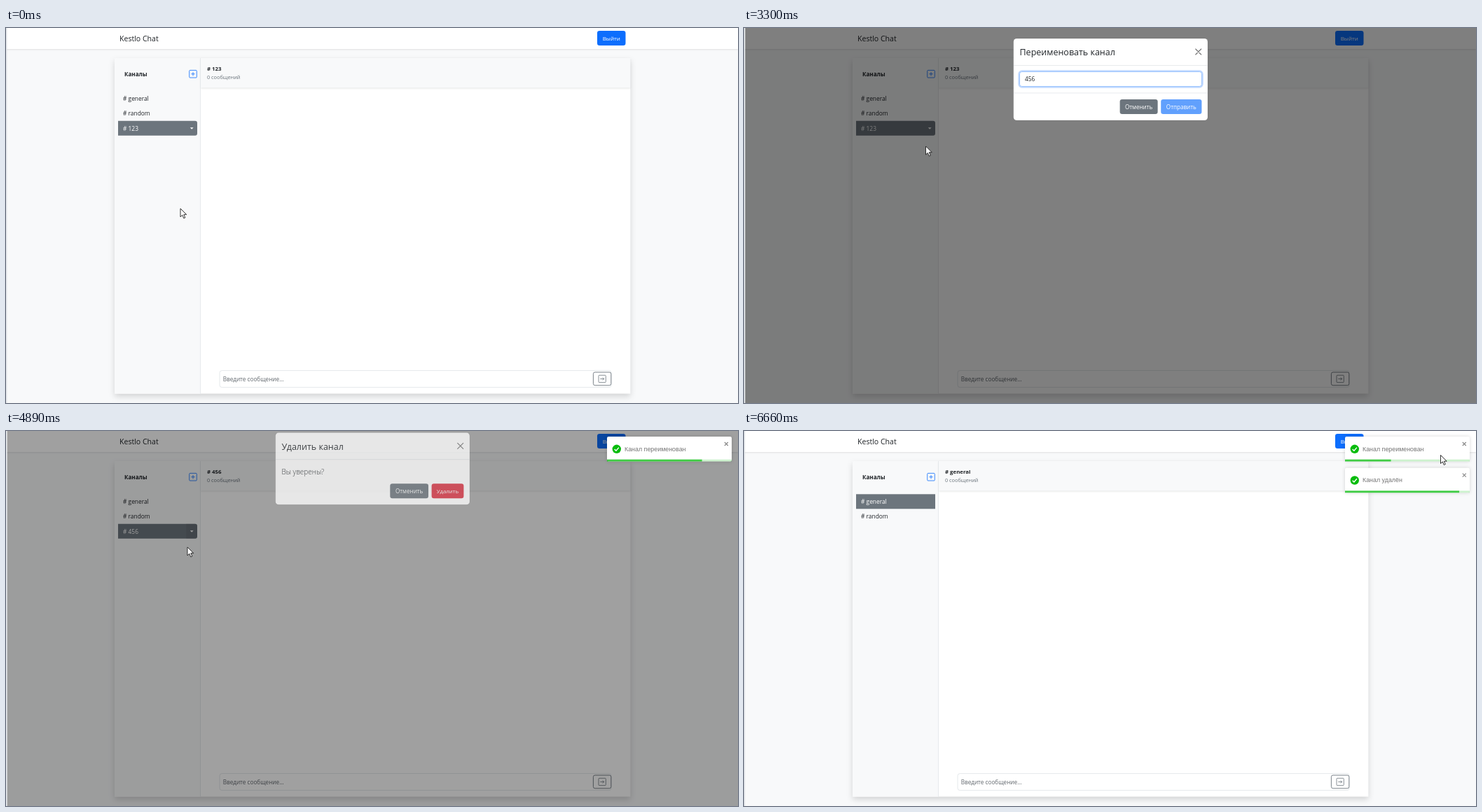
An HTML page for the animation above (6.69 s loop, 1045x536 px).

```html
<!DOCTYPE html>
<html lang="ru">
<head>
<meta charset="utf-8">
<title>Chat</title>
<style>
html, body { margin: 0; width: 100%; height: 100%; overflow: hidden; background: #f8f9fa; }
svg { display: block; width: 1045px; height: 536px; }
text { font-family: "Open Sans", "Noto Sans", sans-serif; white-space: pre; }
.toast text { font-family: "Liberation Sans", Arial, sans-serif; }
.shadow { filter: drop-shadow(0 4.4px 4.4px rgba(0,0,0,.15)); }
.shadow-sm { filter: drop-shadow(0 1px 1px rgba(0,0,0,.1)); }
.shadow-toast { filter: drop-shadow(0 .6px 2.8px rgba(0,0,0,.16)); }
</style>
</head>
<body>
<svg id="stage" viewBox="0 0 1045 536" xmlns="http://www.w3.org/2000/svg"></svg>
<script>
const LOOP = 6690, STEP = 30;
const INK = '#212529', GRAY = '#6c757d', BLUE = '#0d6efd', RED = '#dc3545', PALE = '#f8f9fa', LINE = '#dee2e6';
const stage = document.getElementById('stage');

const rect = (x, y, w, h, fill, extra = '') =>
  `<rect x="${x}" y="${y}" width="${w}" height="${h}" fill="${fill}" ${extra}/>`;
const text = (x, y, size, str, fill = INK, extra = '') =>
  `<text x="${x}" y="${y}" font-size="${size}" fill="${fill}" ${extra}>${str}</text>`;
const path = (d, stroke, width, extra = '') =>
  `<path d="${d}" fill="none" stroke="${stroke}" stroke-width="${width}" ${extra}/>`;
const group = (id, body, extra = '') => `<g id="${id}" ${extra}>${body}</g>`;

const button = (id, x, y, w, label, fill, size = 8.1) => group(id,
  rect(x, y, w, 21, fill, 'rx="3.3"') +
  text(x + w / 2, y + 13.6, size, label, '#fff', 'text-anchor="middle"'));

const modal = (id, title, height, body) => group(id,
  rect(384.7, 15, 277.3, height, '#fff', 'rx="4.4" stroke="#000" stroke-opacity=".18" stroke-width=".6"') +
  text(393.5, 39.3, 12.5, title, INK, 'font-weight="500"') +
  path('M644.7 30l8 8m0-8l-8 8', '#000', 1.1, 'opacity=".55" stroke-linecap="round"') +
  rect(385, 53, 276.8, .7, LINE) + body);

const toast = (id, y, label) => group(id,
  rect(858, y, 178, 35.5, '#fff', 'rx="2.2" class="shadow-toast"') +
  `<circle cx="871.8" cy="${y + 17.8}" r="6.2" fill="#07bc0c"/>` +
  path(`M868.7 ${y + 18}l2.2 2.3 4-4.7`, '#fff', 1.4) +
  text(883, y + 20.7, 8.9, label, '#757575') +
  path(`M1025.8 ${y + 8}l5 5m0-5l-5 5`, '#8a8a8a', 1.2) +
  rect(858, y + 32.7, 178, 2.8, '#07bc0c', 'opacity=".2"') +
  rect(858, y + 32.7, 178, 2.8, '#07bc0c', `opacity=".7" id="${id}Bar"`), 'class="toast"');

const page =
  rect(0, 0, 1045, 536, PALE) +
  rect(0, 0, 1045, 30, '#fff', 'class="shadow-sm"') +
  text(162, 18.8, 10.55, 'Kestlo Chat') +
  button('logout', 844, 4, 40.5, 'Выйти', BLUE, 8) +
  rect(155, 43, 736.3, 479.6, '#fff', 'class="shadow"') +
  rect(155, 43, 122.5, 479.6, PALE) +
  rect(278, 43, 613.3, 42.4, PALE, 'class="shadow-sm"') +
  rect(277.3, 43, .7, 479.6, LINE) +
  text(169, 69, 8.1, 'Каналы', INK, 'font-weight="700"') +
  rect(261.7, 60.4, 10.6, 10.6, 'none', `rx="1.1" stroke="${BLUE}" stroke-width=".8"`) +
  path('M267 63v5.4m-2.7-2.7h5.4', BLUE, .8) +
  rect(160, 90.3, 113, 21, GRAY, 'id="generalBg"') +
  text(167, 104, 8.4, '# general', INK, 'id="general"') +
  text(167, 125.2, 8.4, '# random') +
  group('channel',
    path('M160 132.7h110a3 3 0 0 1 3 3v15a3 3 0 0 1-3 3h-110z', 'none', 0, `style="fill:${GRAY}"`) +
    path('M257.3 132.7h12.7a3 3 0 0 1 3 3v15a3 3 0 0 1-3 3h-12.7z', 'none', 0, 'id="toggle" style="fill:#565e64"') +
    text(167, 146.5, 8.4, '', '#fff', 'id="channelName"') +
    '<path d="M262.8 142.2h4.8l-2.4 2.5z" fill="#fff"/>') +
  text(287, 61.3, 7.85, '', INK, 'id="heading" font-weight="700"') +
  text(287, 73, 7.35, '0 сообщений', GRAY) +
  rect(305, 489.6, 559, 24, '#fff', `rx="3.3" stroke="${LINE}" stroke-width=".8"`) +
  text(309.7, 504.8, 8.2, 'Введите сообщение...', '#63696f') +
  rect(838.4, 492, 25.4, 18.8, '#fff', `rx="2.4" stroke="${GRAY}" stroke-width=".9"`) +
  rect(846, 496.3, 10.3, 10.3, 'none', `rx="1" stroke="${GRAY}" stroke-width=".8"`) +
  path('M848.3 501.5h5.4m-2-2l2 2-2 2', GRAY, .8);

const menu = group('menu',
  rect(184, 154.8, 89, 45.5, '#fff', 'rx="3.3" stroke="#000" stroke-opacity=".17" stroke-width=".6"') +
  rect(184.3, 159.8, 88.4, 17.7, '#e9ecef', 'id="menuHover"') +
  text(193, 171.7, 8.2, 'Удалить') +
  text(193, 189.4, 8.2, 'Переименовать'));

const renameModal = modal('rename', 'Переименовать канал', 117,
  rect(392.4, 61.4, 262.2, 23.2, 'none', `rx="4.4" stroke="${BLUE}" stroke-opacity=".25" stroke-width="2.2"`) +
  rect(393.5, 62.5, 260, 21, '#fff', 'rx="3.3" stroke="#86b7fe" stroke-width=".8"') +
  rect(400.8, 66, 14.6, 13.4, '#2f64c8', 'id="selection"') +
  text(401, 76.1, 8.4, '', INK, 'id="field"') +
  rect(401, 67.5, .7, 11, INK, 'id="caret"') +
  rect(385, 92.6, 276.8, .7, LINE) +
  button('cancelRename', 536.6, 102, 54, 'Отменить', GRAY) +
  button('submitRename', 595.2, 102, 58.2, 'Отправить', BLUE));

const deleteModal = modal('remove', 'Удалить канал', 103,
  text(393.5, 75, 10, 'Вы уверены?', INK, 'font-weight="300"') +
  button('cancelRemove', 548.3, 88, 54.7, 'Отменить', GRAY) +
  button('submitRemove', 607.6, 88, 45.8, 'Удалить', RED, 7.9));

const cursor = group('cursor',
  '<path id="arrow" d="M0 0V12l2.8-2.6 2 4.6 2-.9-2-4.4h3.9z"/>' +
  '<path id="hand" d="M-1.3 1.2a1.3 1.3 0 0 1 2.6 0V6l4.2 1a1.6 1.6 0 0 1 1.3 1.6l-.8 4-1 2.2H.2L-3.6 9.8c-.8-1.3.6-2.2 1.4-1.4l.9.9z"/>',
  'fill="#fff" stroke="#1c1c1c" stroke-width=".9" stroke-linejoin="round"');

stage.innerHTML = page + menu + rect(1.5, 0, 1044, 536, '#000', 'id="backdrop"') +
  renameModal + deleteModal + toast('renamed', 8, 'Канал переименован') +
  toast('removed', 52.7, 'Канал удалён') + rect(0, 0, 1.4, 536, LINE) + cursor;

const el = {};
stage.querySelectorAll('[id]').forEach(node => el[node.id] = node);

const clamp = v => Math.min(1, Math.max(0, v));
const mix = (a, b, k) => a + (b - a) * k;
const within = (t, a, b) => t >= a && t < b;
const smooth = k => k * k * (3 - 2 * k);
const easeOut = k => 1 - (1 - k) ** 1.7;
const show = (node, on) => node.setAttribute('visibility', on ? 'visible' : 'hidden');
const set = (node, attrs) => { for (const k in attrs) node.setAttribute(k, attrs[k]); };
const write = (node, str) => { if (node.textContent !== str) node.textContent = str; };

function follow(keys, t, ease) {
  const i = keys.findIndex(key => key[0] > t);
  if (i < 0) return keys[keys.length - 1].slice(1);
  if (i === 0) return keys[0].slice(1);
  const a = keys[i - 1], b = keys[i], k = ease((t - a[0]) / (b[0] - a[0]));
  return a.slice(1).map((v, n) => mix(v, b[n + 1], k));
}

const POINTER = [
  [0, 249, 258], [180, 249, 258], [660, 265, 144], [860, 265, 144], [1350, 251, 187],
  [1560, 251.5, 187], [1740, 257.7, 179.5], [1860, 259.5, 169], [3540, 259.5, 169],
  [3930, 264, 143], [4260, 264, 143], [4600, 253, 167], [4860, 253.5, 167],
  [5280, 630.8, 95.5], [5520, 630.8, 95.5], [6180, 990, 46], [6660, 994.5, 34.5]
];
// Offset and opacity of a toast bouncing in from the right
const BOUNCE = [[0, 1665, 0], [.6, -14, 1], [.75, 5.5, 1], [.9, -2.8, 1], [1, 0, 1]];

function drawModal(node, t, opens, closes) {
  const closing = t >= closes, since = closing ? t - closes : t - opens;
  const fade = clamp(since / 135), slide = easeOut(clamp(since / 270));
  const opacity = closing ? 1 - fade : fade;
  show(node, opacity > 0);
  set(node, { opacity, transform: `translate(0 ${-28 * (closing ? slide : 1 - slide)})` });
  return opacity;
}

function drawToast(node, bar, t, enters, runs) {
  const [x, opacity] = follow(BOUNCE, (t - enters) / 630, k => 1 - (1 - k) ** 3);
  show(node, t >= enters);
  set(node, { opacity, transform: `translate(${x} 0)` });
  set(bar, { width: 178 * (1 - clamp((t - runs) / 4500)) });
}

function render(t) {
  const removed = t >= 5740;
  const name = t < 3320 ? '# 123' : removed ? '# general' : '# 456';
  write(el.heading, name);
  if (!removed) write(el.channelName, name);
  show(el.generalBg, removed);
  set(el.general, { fill: removed ? '#fff' : INK });
  el.channel.style.display = removed ? 'none' : '';

  const pressed = (from, to) => clamp((t - from) / 90) * (1 - clamp((t - to) / 90));
  set(el.toggle, { opacity: pressed(580, 1640) + pressed(3840, 4825) });

  const [x, y] = follow(POINTER, t, smooth);
  const menuOpen = within(t, 780, 1575) || within(t, 4200, 4770);
  show(el.menu, menuOpen);
  show(el.menuHover, menuOpen && y > 159);
  set(el.menuHover, { y: y < 177.5 ? 159.8 : 177.5 });

  const shade = drawModal(el.rename, t, 1621, 3312) + drawModal(el.remove, t, 4789, 5720);
  set(el.backdrop, { opacity: shade / 2 });

  const typed = t < 2220 ? '123' : '456'.slice(0, t < 2400 ? 1 : t < 2580 ? 2 : 3);
  write(el.field, typed);
  set(el.field, { fill: t < 2220 ? '#fff' : INK });
  el.selection.style.display = t < 2220 ? '' : 'none';
  el.caret.style.display = within(t, 2220, 3030) ? '' : 'none';
  set(el.caret, { x: 401.2 + typed.length * 4.8 });
  set(el.submitRename, { opacity: t >= 3150 ? .65 : 1 });
  set(el.submitRemove, { opacity: t >= 5490 ? .65 : 1 });
  set(el.submitRemove.firstChild, { fill: within(t, 5220, 5490) ? '#c42f3e' : RED });

  drawToast(el.renamed, el.renamedBar, t, 3200, 3818);
  drawToast(el.removed, el.removedBar, t, 5630, 6282);

  const pointing = within(t, 600, 1575) || within(t, 3870, 4770) || within(t, 5220, 5550);
  set(el.cursor, { transform: `translate(${x} ${y})` });
  show(el.hand, pointing);
  show(el.arrow, !pointing);
}

const start = performance.now();
function tick() {
  const t = (performance.now() - start) % LOOP;
  render(Math.floor(t / STEP) * STEP);
  requestAnimationFrame(tick);
}
tick();
</script>
</body>
</html>
```
